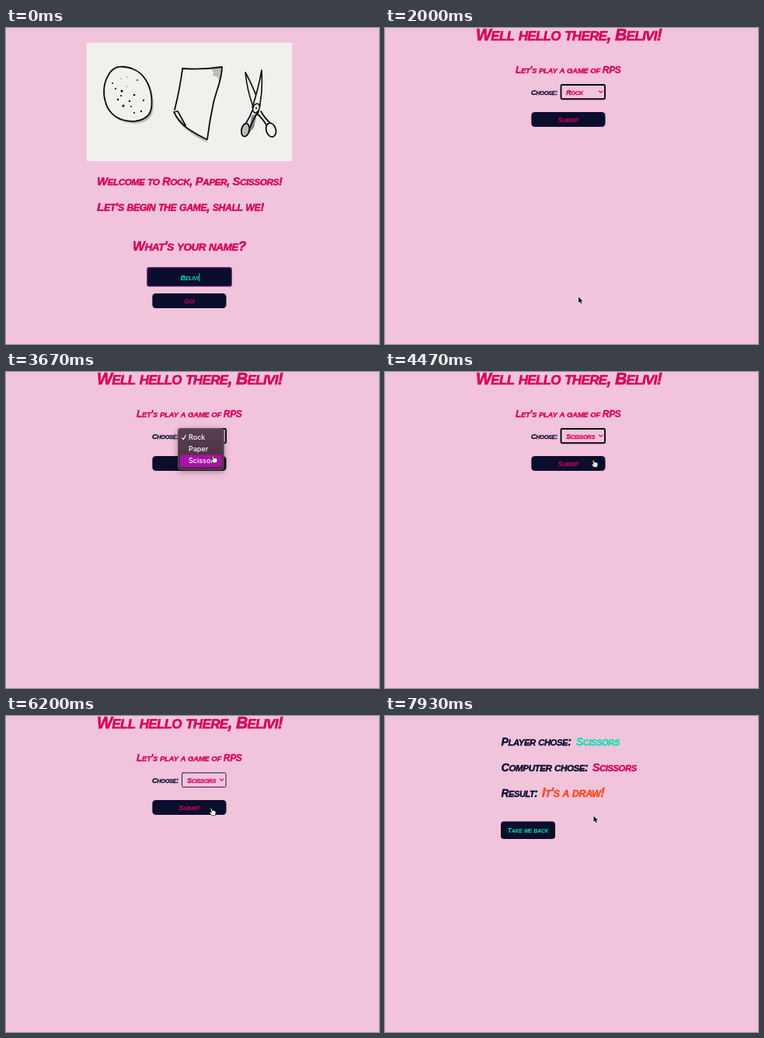
Animation, 480 px wide and 406 px high, one loop 8000 ms. Source, as an HTML page with a canvas:

```html
<!DOCTYPE html>
<html lang="en">
<head>
<meta charset="utf-8">
<title>Rock, Paper, Scissors</title>
<style>
html, body { margin: 0; width: 100%; height: 100%; overflow: hidden; background: #f2c4dc; }
canvas { display: block; width: 480px; height: 406px; }
</style>
</head>
<body>
<canvas id="stage"></canvas>
<script>
const LOOP = 8000, W = 480, H = 406;
const PINK = '#f2c4dc', NAVY = '#0a0d2c', RED = '#d6005b', TEAL = '#12deb0', ORANGE = '#ff4a1c';
const INK = '#0b0b0d', SHADE = '#bdbbba';
const NAME = 'Belivi';

const canvas = document.getElementById('stage');
const ctx = canvas.getContext('2d');
const ratio = window.devicePixelRatio || 1;
canvas.width = W * ratio;
canvas.height = H * ratio;
ctx.scale(ratio, ratio);
ctx.lineJoin = ctx.lineCap = 'round';

// Marker lettering: capitals plus slightly smaller capitals for lower case.
function marker(text, x, y, size, color, { center = false, heavy = true } = {}) {
  const runs = text.match(/[a-z]+|[^a-z]+/g).map(run => ({
    text: run.toUpperCase(),
    font: `italic bold ${/[a-z]/.test(run) ? size * 0.8 : size}px "Liberation Sans", sans-serif`
  }));
  ctx.letterSpacing = `${-0.03 * size}px`;
  ctx.textBaseline = 'alphabetic';
  ctx.fillStyle = ctx.strokeStyle = color;
  ctx.lineWidth = size * 0.03;
  let total = 0;
  for (const run of runs) {
    ctx.font = run.font;
    run.width = ctx.measureText(run.text).width;
    total += run.width;
  }
  if (center) x -= total / 2;
  for (const run of runs) {
    ctx.font = run.font;
    ctx.fillText(run.text, x, y);
    if (heavy) ctx.strokeText(run.text, x, y);
    x += run.width;
  }
  ctx.letterSpacing = '0px';
  return x;
}

function box(x, y, w, h, r, fill, stroke, line = 1) {
  ctx.beginPath();
  ctx.roundRect(x, y, w, h, r);
  if (fill) { ctx.fillStyle = fill; ctx.fill(); }
  if (stroke) { ctx.strokeStyle = stroke; ctx.lineWidth = line; ctx.stroke(); }
}

function shape(d, stroke, line = 1.5, fill) {
  const path = new Path2D(d);
  if (fill) { ctx.fillStyle = fill; ctx.fill(path); }
  if (stroke) { ctx.strokeStyle = stroke; ctx.lineWidth = line; ctx.stroke(path); }
}

function oval(x, y, rx, ry, tilt, fill, stroke, line = 1.7) {
  ctx.beginPath();
  ctx.ellipse(x, y, rx, ry, tilt, 0, Math.PI * 2);
  if (fill) { ctx.fillStyle = fill; ctx.fill(); }
  if (stroke) { ctx.strokeStyle = stroke; ctx.lineWidth = line; ctx.stroke(); }
}

const ROCK = 'M153 50C143 48 135 53 131 62C125 72 125 86 128 95C131 107 140 115 150 118' +
  'C160 121 174 121 182 113C188 108 188 96 187 87C185 72 177 58 164 53C160 51 156 50 150 50';
const SPECKS = [[137,71,1], [148,65,.5], [156,63,.5], [169,67,.9], [141,78,1.1], [149,81,1.5],
  [148,87,1.1], [165,86,1.3], [144,92,1.3], [159,94,1.2], [177,93,1.2], [151,100,1.6],
  [161,101,1], [165,109,1.1], [174,107,1.2], [155,75,.6]];

function drawing() {
  const paper = '#f2f0ed';
  box(104, 19, 264, 152, 0, paper);

  ctx.save();
  ctx.translate(2.5, 3);
  shape(ROCK, null, 0, SHADE);
  ctx.restore();
  shape(ROCK, INK, 1.8, paper);
  SPECKS.forEach(([x, y, r]) => oval(x, y, r, r, 0, INK));

  shape('M217 112C222 125 240 138 258 147L260 141L230 122Z', null, 0, SHADE);
  shape('M227 52Q252 54 278 50C277 66 271 79 267 96L259 143Q246 138 232 127L222 108L216 108Z', null, 0, paper);
  shape('M264 52L278 50Q278 60 274 69Q273 60 266 62Q268 56 264 52Z', null, 0, SHADE);
  shape('M227 53Q224 77 217 105M227 52Q252 54 278 50C278 66 271 79 267 96Q262 119 259 143', INK, 1.8);
  shape('M216 108Q223 122 235 130T258 143M216 108L221 107L231 125', INK, 1.7);

  shape('M316 113L323 109L319 128L312 136Z', null, 0, '#858384');
  shape('M308 57Q310 79 318 101L327 100Q318 75 308 57Z', INK, 1.6, paper);
  shape('M329 54Q325 77 317 102L324 111Q331 85 329 54Z', INK, 1.6, paper);
  shape('M318 104Q314 114 309 122M324 109Q318 117 314 128M323 110Q330 116 336 126M328 107Q333 116 340 122', INK, 1.8);
  oval(308, 131, 5, 8.5, 0.2, SHADE, INK, 1.8);
  oval(341, 131, 6.2, 9, -0.3, paper, INK, 1.8);
  oval(322, 103, 4, 6, 0.4, paper, INK, 1.5);
  oval(322, 103, 1, 1.2, 0, INK);
}

function welcome(t) {
  drawing();
  marker('Welcome to Rock, Paper, Scissors!', 117, 202, 14.8, RED);
  marker("Let's begin the game, shall we!", 117, 235, 15.4, RED);
  marker("What's your name?", 163, 286, 16.9, RED);
  box(182, 308, 108, 23.5, 2, NAVY, '#40125f', 1.5);
  const end = marker(NAME, 236, 323.5, 9, TEAL, { center: true, heavy: false });
  if (t < 530 || t >= 1030) {
    ctx.fillStyle = TEAL;
    ctx.fillRect(end + 0.8, 315, 1, 10.5);
  }
  box(188.3, 341, 95.2, 19, 4.5, NAVY);
  marker('Go!', 236, 354, 8.2, RED, { center: true, heavy: false });
}

function menu(row) {
  ctx.save();
  ctx.shadowColor = 'rgba(40,10,35,.4)';
  ctx.shadowBlur = 8;
  ctx.shadowOffsetY = 2;
  const fill = ctx.createLinearGradient(0, 72, 0, 126);
  fill.addColorStop(0, '#59404f');
  fill.addColorStop(1, '#4a2d40');
  box(221, 72, 59.5, 54, 4, fill);
  ctx.restore();
  box(221.5, 72.5, 58.5, 53, 4, null, '#6d5365', 0.7);
  if (row >= 0) box(224, 76 + row * 15.3, 54, 15.5, 2.5, '#a911a6');
  shape('M226.5 84.5L228.2 86.7L231.4 81', '#fff', 1.1);
  ctx.font = '500 9px Inter, sans-serif';
  ctx.textBaseline = 'alphabetic';
  ctx.fillStyle = '#fff';
  ['Rock', 'Paper', 'Scissors'].forEach((word, i) => ctx.fillText(word, 235, 86.5 + i * 15.3));
}

function menuRow(t) {
  if (t < 3530) return 0;
  if (t < 3600) return 1;
  return t >= 3870 && t < 3930 ? -1 : 2;
}

function choose(t) {
  marker(`Well hello there, ${NAME}!`, 117, 15.5, 21.2, RED);
  marker("Let's play a game of RPS", 168, 58, 12, RED);
  marker('Choose:', 188, 86.3, 9.1, NAVY);
  const focused = t < 4600;
  box(226.5, 73, 56.5, 18.3, 1.5, null, focused ? '#08060f' : '#2a1650', focused ? 1.9 : 1);
  marker(t < 3930 ? 'Rock' : 'Scissors', 233, 86.1, 9.2, RED);
  shape('M275.4 80.8L277.6 83L279.8 80.8', RED, 1.1);
  box(188.3, 108, 95.2, 19, 4.5, NAVY);
  marker('Submit', 236, 121, 8.9, RED, { center: true, heavy: false });
  if (t >= 3270 && t < 4000) menu(menuRow(t));
}

function result() {
  marker('Player chose:', 149.5, 37.5, 14.1, NAVY);
  marker('Scissors', 246, 37.5, 13.9, TEAL);
  marker('Computer chose:', 149.5, 70.5, 14.5, NAVY);
  marker('Scissors', 267, 70.5, 14.1, RED);
  marker('Result:', 149.5, 103.5, 13.8, NAVY);
  marker("It's a draw!", 202, 103.5, 15.8, ORANGE);
  box(149, 135.5, 70, 22.5, 4, NAVY);
  marker('Take me back', 184, 150.3, 8.8, TEAL, { center: true, heavy: false });
}

// Pointer stops: time, x, y.
const TRACK = [[70, 296, 228], [530, 268, 318], [730, 268, 318], [1200, 245, 344], [1470, 245, 344],
  [1600, 245, 346], [1800, 249, 346], [2400, 249, 346], [3200, 265, 83], [3400, 265, 83],
  [3670, 266, 108], [4400, 266, 108], [4700, 279.5, 147], [4800, 279.5, 147], [5200, 269, 122],
  [5330, 264, 119], [6800, 264, 119], [7000, 264, 125], [7200, 264, 125], [7400, 267.5, 128],
  [7870, 267.5, 128], [7930, 268.5, 129]];

function pointerAt(t) {
  const i = TRACK.findIndex(stop => stop[0] > t);
  if (i < 0) return TRACK[TRACK.length - 1].slice(1);
  const [t0, x0, y0] = TRACK[i - 1], [t1, x1, y1] = TRACK[i];
  const k = (t - t0) / (t1 - t0), e = k * k * (3 - 2 * k);
  return [x0 + (x1 - x0) * e, y0 + (y1 - y0) * e];
}

const ARROW = 'M0 0V8.6L2 6.9L3.5 10L5 9.3L3.6 6.3H6.2Z';
const HAND = 'M-.9 .5Q0 -.7 1 .6L1.8 3.6Q3 2.6 3.7 3.7Q5 3 5.4 4.3Q6.8 4 6.8 5.5' +
  'Q7 8 5.6 10.6H.9Q-.6 8.5 -2.4 6.6Q-2.3 5.2 -.6 5.9L.2 6.2Z';
const BEAM = 'M-1.5 -5Q0 -5 0 -3.8Q0 -5 1.5 -5M0 -3.8V3.8M-1.5 5Q0 5 0 3.8Q0 5 1.5 5';

function pointer(t) {
  if (t < 70) return;
  const [x, y] = pointerAt(t);
  const inside = (l, top, r, b) => x >= l && x <= r && y >= top && y <= b;
  const overField = t < 1800 && inside(182, 308, 290, 332);
  const overButton = (t < 1800 && inside(188, 341, 284, 360)) ||
    (t >= 1800 && t < 1930) ||
    (t >= 2000 && t < 7000 && inside(188, 72, 284, 127));
  ctx.save();
  ctx.translate(x, y - 0.5);
  ctx.scale(0.88, 0.88);
  if (overField) shape(BEAM, '#d8d4dc', 0.9);
  else if (overButton) shape(HAND, '#111', 0.8, '#fff');
  else {
    shape(ARROW, '#fff', 1.2);
    shape(ARROW, null, 0, '#08080a');
  }
  ctx.restore();
}

function draw(now) {
  const t = now % LOOP;
  ctx.fillStyle = PINK;
  ctx.fillRect(0, 0, W, H);
  if (t < 1800) welcome(t);
  else if (t < 6600) choose(t);
  else result();
  pointer(t);
}

const start = performance.now();
function tick() {
  draw(performance.now() - start);
  requestAnimationFrame(tick);
}
tick();
</script>
</body>
</html>
```
